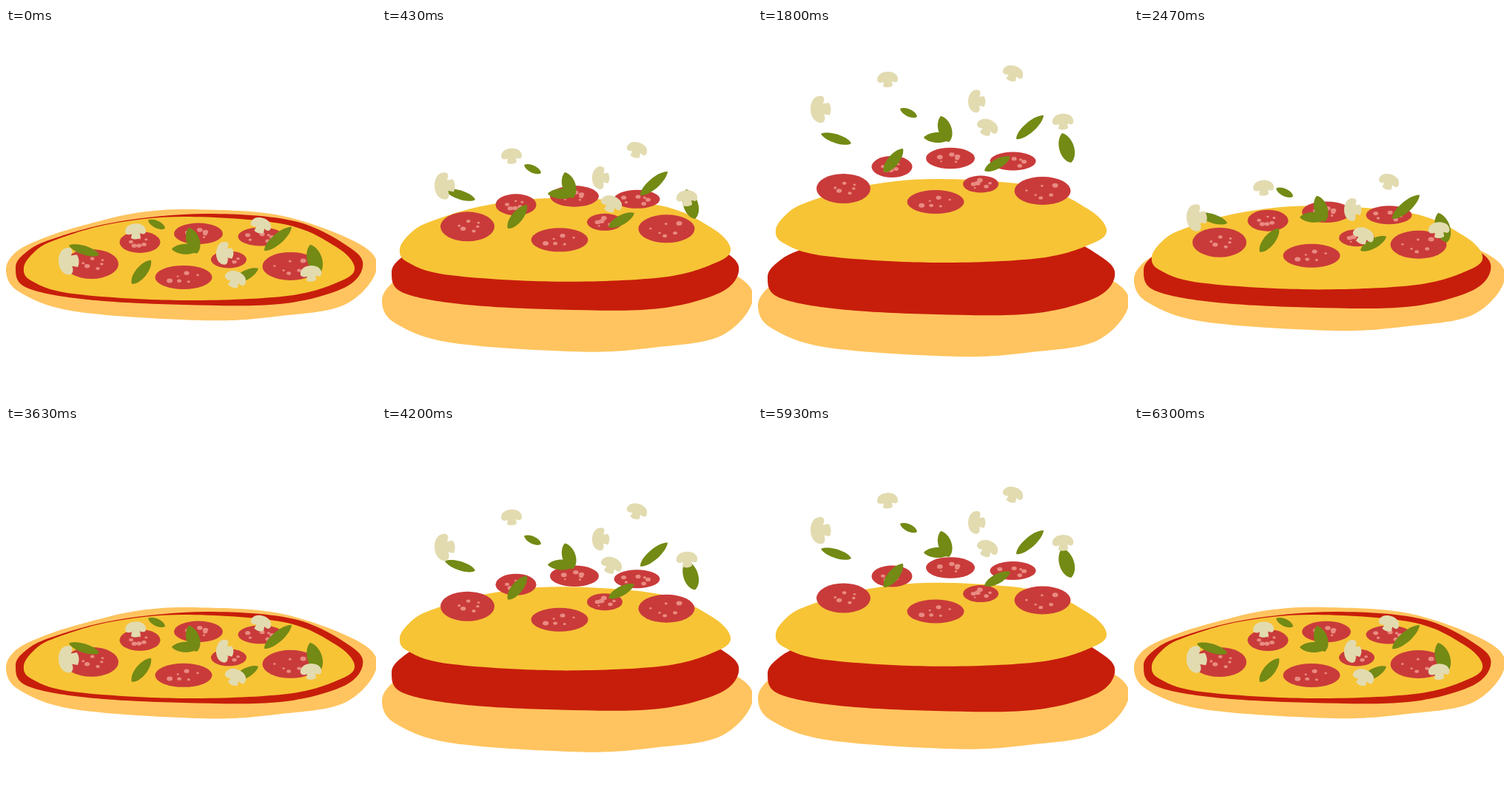
An HTML page with a canvas that plays this animation: 500 by 500 pixels, repeating every 7.23 s.

```html
<!DOCTYPE html>
<html lang="en">
<head>
<meta charset="utf-8">
<title>Pizza layers</title>
<style>
  html, body { margin: 0; width: 100%; height: 100%; overflow: hidden; background: #fff; }
  canvas { display: block; width: 500px; height: 500px; }
</style>
</head>
<body>
<canvas id="stage" width="500" height="500"></canvas>
<script>
const ctx = document.getElementById('stage').getContext('2d');

const LOOP = 7230, SECOND = 3626, MOVE = 900, CLOSE = 1800, LEAD = 17;

let seed = 11;
const random = () => (seed = seed * 16807 % 2147483647) / 2147483647;

// Smooth closed curve through a few key points.
function blob(text) {
  const pts = text.split(' ').map(s => s.split(',').map(Number));
  const n = pts.length, path = new Path2D();
  path.moveTo(...pts[0]);
  for (let i = 0; i < n; i++) {
    const a = pts[(i + n - 1) % n], b = pts[i], c = pts[(i + 1) % n], d = pts[(i + 2) % n];
    path.bezierCurveTo(
      b[0] + (c[0] - a[0]) / 6, b[1] + (c[1] - a[1]) / 6,
      c[0] - (d[0] - b[0]) / 6, c[1] - (d[1] - b[1]) / 6, c[0], c[1]);
  }
  return path;
}

function slice([x, y, rx, ry]) {
  const path = new Path2D();
  path.ellipse(x, y, rx, ry, 0, 0, 7);
  return path;
}

// Spots scattered around a slice by the golden angle.
function fat([x, y, rx, ry]) {
  const path = new Path2D(), turn = random() * 6;
  for (let k = 0; k < 6; k++) {
    const a = turn + k * 2.4, r = 0.2 + 0.4 * random(), w = 1.5 + 2.5 * random();
    const sx = x + rx * r * Math.cos(a), sy = y + ry * r * Math.sin(a);
    path.moveTo(sx + w, sy);
    path.ellipse(sx, sy, w, w * 0.75, 0, 0, 7);
  }
  return path;
}

// Pointed leaf between two ends, w is half its width.
function leaf([x1, y1, x2, y2, w]) {
  const dx = x2 - x1, dy = y2 - y1, side = w / 0.75 / Math.hypot(dx, dy);
  const at = (f, s) => [x1 + dx * f - dy * side * s, y1 + dy * f + dx * side * s];
  const path = new Path2D();
  path.moveTo(x1, y1);
  path.bezierCurveTo(...at(0.2, 1), ...at(0.85, 1), x2, y2);
  path.bezierCurveTo(...at(0.85, -1), ...at(0.2, -1), x1, y1);
  return path;
}

const cap = new Path2D('M-14 1C-14-13 14-14 14 0 14 6 8 4 6 3L7 9Q1 13-6 10L-5 4C-9 6-14 5-14 1Z');

function mushroom([x, y, angle, size]) {
  const path = new Path2D();
  path.addPath(cap, new DOMMatrix().translate(x, y).rotate(angle).scale(size));
  return path;
}

// All shapes are placed as they sit when the pizza is spread apart.
const dough = blob('0,377 14,351 55,331 110,314 180,298 260,294 375,303 480,342 500,378 457,423 370,438 270,444 95,432 19,406');
const sauce = blob('13,337 26,317 60,299 150,275 270,264 390,274 465,310 482,336 455,365 370,386 240,387 110,380 28,364');
const cheese = blob('24,273 38,252 65,236 140,214 240,204 375,214 445,244 471,272 452,291 380,311 235,317 90,308 35,291');

const slices = [
  [115.5, 217, 36.5, 20], [181, 187.5, 27.5, 14.5], [260, 176, 33, 14.3], [344.5, 180, 31, 12.5],
  [301, 211, 24, 11.5], [240, 235, 38.5, 16], [384.5, 220, 38, 19]
];
const salami = slices.map(slice), spots = slices.map(fat);

const leaves = [
  [85, 143, 126, 156, 6], [192, 109, 215, 120, 5], [247, 119, 258, 154, 9], [224, 148, 261, 148, 7],
  [386, 118, 349, 150, 7], [411, 142, 423, 182, 10], [196, 163, 170, 195, 7.5], [341, 174, 306, 193, 6.5]
].map(leaf);

const mushrooms = [
  [84, 110, -90, 1.3], [175, 69, 0, 1], [344.5, 61, 20, 1],
  [295, 99, -85, 1.1], [310, 134, 25, 1.05], [412, 126, 0, 1.02]
].map(mushroom);

const clamp = x => Math.min(1, Math.max(0, x));
const sine = x => (1 - Math.cos(Math.PI * clamp(x))) / 2;
const cubic = x => x < 0.5 ? 4 * x ** 3 : 1 - 4 * (1 - x) ** 3;

// How far the layers are apart, 0 to 1; the base leaves the sauce sooner.
function spread(ms) {
  const t = ms % LOOP;
  const phase = (t < SECOND ? t : t - SECOND) + LEAD;
  if (phase < CLOSE) {
    const x = phase / MOVE;
    return { all: sine(x), base: sine(x * 2) };
  }
  const left = 1 - cubic(clamp((phase - CLOSE) / MOVE) ** 2);
  return { all: left, base: left };
}

function layer(dy, color, shapes) {
  ctx.setTransform(1, 0, 0, 1, 0, dy);
  ctx.fillStyle = color;
  for (const s of shapes) ctx.fill(s);
}

function draw(ms) {
  const { all, base } = spread(ms);
  const shut = 1 - all;
  ctx.setTransform(1, 0, 0, 1, 0, 0);
  ctx.fillStyle = '#fff';
  ctx.fillRect(0, 0, 500, 500);
  layer(-13 * shut - 36 * (1 - base), '#ffc45f', [dough]);
  layer(-13 * shut, '#c71e0b', [sauce]);
  layer(51 * shut, '#f7c436', [cheese]);
  layer(102 * shut, '#c93b3a', salami);
  layer(102 * shut, '#e98b82', spots);
  layer(151 * shut, '#738a14', leaves);
  layer(205.5 * shut, '#e2dbb0', mushrooms);
}

const start = performance.now();
function tick() {
  draw(performance.now() - start);
  requestAnimationFrame(tick);
}
tick();
</script>
</body>
</html>
```
